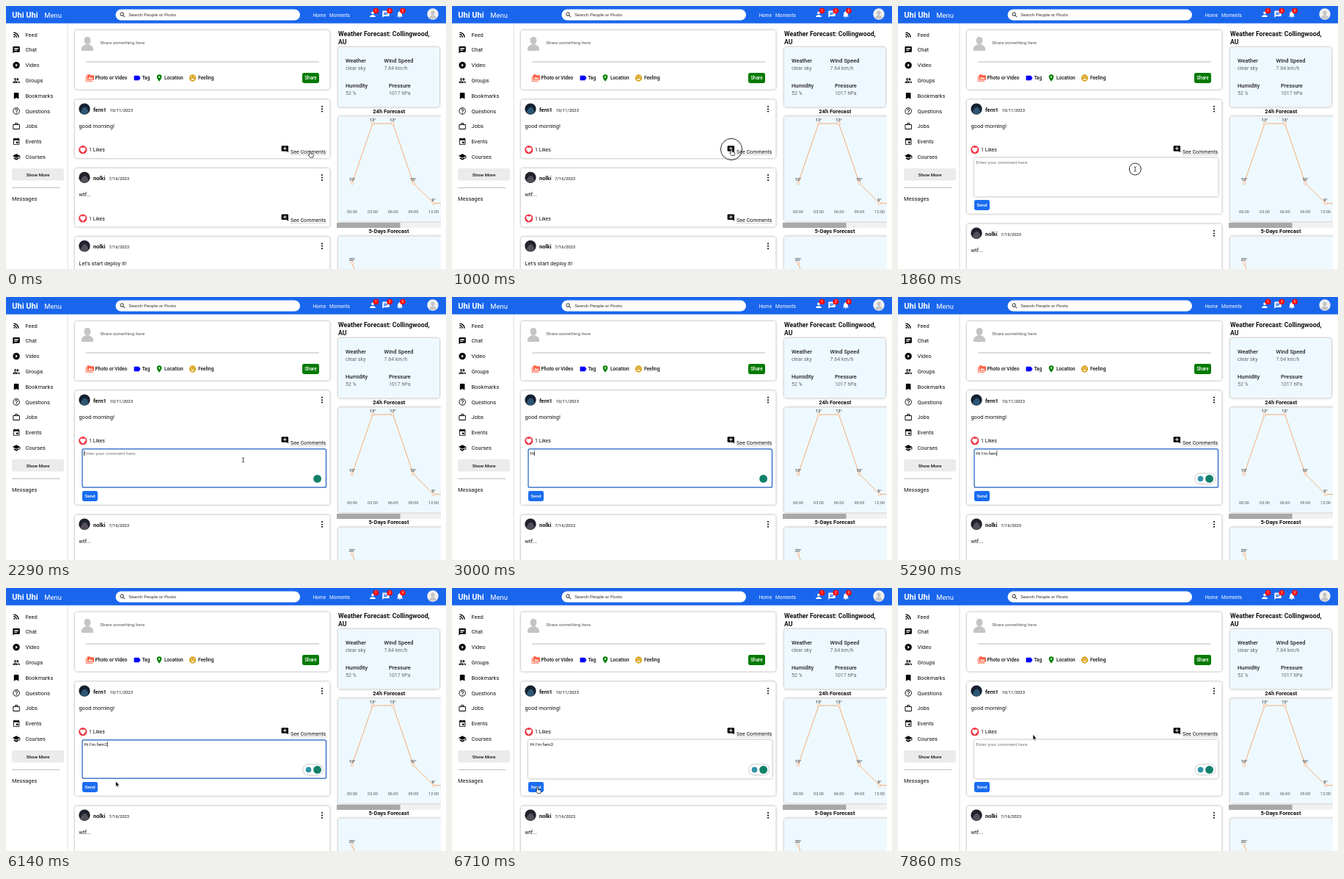
An HTML page for the animation above (8 s loop, 600 px wide and 358 px high).

```html
<!DOCTYPE html>
<html lang="en">
<head>
<meta charset="utf-8">
<title>Social feed</title>
<style>
  html, body { margin: 0; width: 100%; height: 100%; overflow: hidden; background: #fff; }
  svg { display: block; width: 100%; height: 100%; }
  text { font-family: Roboto, sans-serif; white-space: pre; }
  .card { filter: drop-shadow(0 .4px 1.6px #0006); }
  .b { font-weight: 700; }
  .m { font-weight: 500; }
  .mid { text-anchor: middle; }
</style>
</head>
<body>
<svg id="stage" viewBox="0 0 600 358"></svg>
<script>
const icons = {
  feed: 'M4 4.4v2.9A12.7 12.7 0 0 1 16.7 20h2.9A15.6 15.6 0 0 0 4 4.4zm0 5.7v2.8A7 7 0 0 1 11 20h2.9A9.9 9.9 0 0 0 4 10.1zM4 17.8a2.2 2.2 0 1 0 4.4 0 2.2 2.2 0 1 0-4.4 0z',
  chat: 'M20 2H4a2 2 0 0 0-2 2v18l4-4h14a2 2 0 0 0 2-2V4a2 2 0 0 0-2-2zM6 9h12v2H6zm8 5H6v-2h8zm4-6H6V6h12z',
  video: 'M12 2a10 10 0 1 0 0 20 10 10 0 0 0 0-20zm-2 14.5v-9l6 4.5z',
  group: 'M9 5a3.5 3.5 0 1 0 0 7 3.5 3.5 0 0 0 0-7zm0 2a1.5 1.5 0 1 1 0 3 1.5 1.5 0 0 1 0-3zm0 6.7c-2.4 0-7 1.2-7 3.5V19h14v-1.800c0-2.300-4.700-3.500-7-3.500zM4.300 17c.9-.6 2.900-1.300 4.700-1.300s3.900.7 4.700 1.300zM15 12a3.500 3.500 0 1 0 0-7l-1.500.3a5.500 5.500 0 0 1 0 6.400zm1 1.800c1.200.9 2 2 2 3.400V19h4v-1.800c0-2-3.500-3.200-6-3.400z',
  bookmark: 'M17 3H7a2 2 0 0 0-2 2v16l7-3 7 3V5a2 2 0 0 0-2-2z',
  help: 'M11 18h2v-2h-2zM12 2a10 10 0 1 0 0 20 10 10 0 0 0 0-20zm0 18a8 8 0 1 1 0-16 8 8 0 0 1 0 16zm0-14a4 4 0 0 0-4 4h2a2 2 0 1 1 4 0c0 2-3 1.750-3 5h2c0-2.250 3-2.500 3-5a4 4 0 0 0-4-4z',
  work: 'M14 6V4h-4v2zM4 8v11h16V8zm16-2a2 2 0 0 1 2 2v11a2 2 0 0 1-2 2H4a2 2 0 0 1-2-2V8a2 2 0 0 1 2-2h4V4a2 2 0 0 1 2-2h4a2 2 0 0 1 2 2v2z',
  event: 'M17 12h-5v5h5zM16 1v2H8V1H6v2H5a2 2 0 0 0-2 2v14a2 2 0 0 0 2 2h14a2 2 0 0 0 2-2V5a2 2 0 0 0-2-2h-1V1zm3 18H5V8h14z',
  school: 'M5 13.200v4L12 21l7-3.800v-4L12 17zM12 3 1 9l11 6 9-4.900V17h2V9z',
  person: 'M12 12a4 4 0 1 0 0-8 4 4 0 0 0 0 8zm0 2c-2.700 0-8 1.300-8 4v2h16v-2c0-2.700-5.300-4-8-4z',
  bell: 'M12 22a2 2 0 0 0 2-2h-4a2 2 0 0 0 2 2zm6-6v-5c0-3-1.600-5.600-4.500-6.300V4a1.500 1.500 0 0 0-3 0v.7C7.600 5.400 6 8 6 11v5l-2 2v1h16v-1z',
  search: 'M15.500 14h-1a6.500 6.500 0 1 0-.5.5v1l5 5 1.500-1.500zm-6 0a4.500 4.500 0 1 1 0-9 4.500 4.500 0 0 1 0 9z',
  tag: 'M17.600 5.800A2 2 0 0 0 16 5H5a2 2 0 0 0-2 2v10a2 2 0 0 0 2 2h11a2 2 0 0 0 1.600-.8L22 12z',
  pin: 'M12 2a7 7 0 0 0-7 7c0 5.250 7 13 7 13s7-7.750 7-13a7 7 0 0 0-7-7zm0 9.500a2.500 2.500 0 1 1 0-5 2.500 2.500 0 0 1 0 5z',
  smile: 'M12 2a10 10 0 1 0 0 20 10 10 0 0 0 0-20zM8.500 8a1.500 1.500 0 1 1 0 3 1.500 1.500 0 0 1 0-3zM12 18c-2.300 0-4.200-1.700-5-4h10c-.8 2.300-2.700 4-5 4zm3.500-7a1.500 1.500 0 1 1 0-3 1.500 1.500 0 0 1 0 3z',
  media: 'M2 6H0v14a2 2 0 0 0 2 2h18v-2H2zm20-2h-8l-2-2H6a2 2 0 0 0-2 2v12a2 2 0 0 0 2 2h16a2 2 0 0 0 2-2V6a2 2 0 0 0-2-2zM7 15l4.500-6 3.500 4.500 2.500-3L21 15z',
  comment: 'M22 4a2 2 0 0 0-2-2H4a2 2 0 0 0-2 2v12a2 2 0 0 0 2 2h14l4 4zM17 11h-4v4h-2v-4H7V9h4V5h2v4h4z'
};

const text = (x, y, size, str, fill = '#111', cls = '') =>
  `<text x="${x}" y="${y}" font-size="${size}" fill="${fill}" class="${cls}">${str}</text>`;
const rect = (x, y, w, h, fill, r = 0, more = '') =>
  `<rect x="${x}" y="${y}" width="${w}" height="${h}" rx="${r}" fill="${fill}" ${more}/>`;
const circle = (x, y, r, fill, more = '') => `<circle cx="${x}" cy="${y}" r="${r}" fill="${fill}" ${more}/>`;
const line = (x1, x2, y, more = '') => `<path d="M${x1} ${y}H${x2}" stroke="#888" stroke-width=".6" ${more}/>`;
const card = (x, y, w, h, fill = '#fff', more = '') => rect(x, y, w, h, fill, 3, `class="card" ${more}`);
// Icons are placed by their centre.
const icon = (name, x, y, fill = '#000', size = 11.3) =>
  `<path transform="translate(${x - size / 2} ${y - size / 2}) scale(${size / 24})" fill="${fill}" fill-rule="evenodd" d="${icons[name]}"/>`;
const silhouette = (x, y, s, fill) =>
  `<g transform="translate(${x} ${y}) scale(${s})" fill="${fill}"><ellipse cy="-3.5" rx="4.6" ry="5.500"/><path d="M-8.300 10V8.500C-8.300 4-4 3-2.500 2h5C4 3 8.300 4 8.300 8.500V10q0 1-1 1H-7.300q-1 0-1-1z"/></g>`;

function header() {
  const badges = [['person', 500, 504.5, 1], ['chat', 518, 523.3, 3], ['bell', 537, 541, 0]];
  return rect(0, 0, 600, 23.6, '#1966ed') +
    text(8.3, 16, 11, 'Uhi Uhi', '#fff', 'b') + text(52.3, 16, 9.4, 'Menu', '#fff') +
    rect(149.5, 4.4, 251.5, 15.2, '#fff', 7.6) + icon('search', 159, 12, '#111', 9.4) +
    text(167.3, 14.4, 6.25, 'Search People or Posts', '#333') +
    text(418.4, 14.6, 6.6, 'Home', '#fff') + text(441, 14.6, 6.6, 'Moments', '#fff') +
    badges.map(([name, x, bx, n]) => icon(name, x, 11.2, '#fff') + circle(bx, 6.5, 3.8, '#f00') +
      text(bx, 8.4, 5.2, n, '#fff', 'mid')).join('') +
    circle(582, 11, 7.7, '#f1f1f1') + silhouette(582, 11.3, .57, '#c6c6c6');
}

function sidebar() {
  const items = [['feed', 'Feed'], ['chat', 'Chat'], ['video', 'Video'], ['group', 'Groups'], ['bookmark', 'Bookmarks'],
    ['help', 'Questions'], ['work', 'Jobs'], ['event', 'Events'], ['school', 'Courses']];
  return rect(83.5, 23, 1.2, 335, '#e4e4e4') +
    items.map(([name, label], i) => icon(name, 14.1, 39 + 20.8 * i) + text(26.4, 41.6 + 20.8 * i, 7.5, label)).join('') +
    rect(8, 221, 71, 16.5, '#ebebeb', 2.5) + text(43.5, 231.5, 6.25, 'Show More', '#111', 'm mid') +
    line(8, 73, 247.3) + text(8, 264.8, 7.5, 'Messages');
}

function shareBox() {
  const options = [['media', 114.4, 121.5, 'Photo or Video', '#ff6347'], ['tag', 178.8, 185.4, 'Tag', '#00f'],
    ['pin', 209, 216, 'Location', '#008000'], ['smile', 254.5, 262, 'Feeling', '#daa520']];
  return card(94, 33, 347.5, 80.5) + silhouette(111, 50.4, .97, '#c4c4c4') +
    text(128.3, 52.2, 6.25, 'Share something here', '#555') + line(109, 427, 76) +
    options.map(([name, x, tx, label, fill]) => icon(name, x, 98, fill) + text(tx, 100.4, 6.6, label, '#111', 'm')).join('') +
    rect(404, 91, 23, 14, '#007a00', 2.4) + text(415.5, 100.2, 6.4, 'Share', '#fff', 'm mid');
}

function post(y, name, date, body, tones, id = '') {
  return card(94, y, 347.5, 79.5, '#fff', id) +
    circle(107, y + 12.5, 7.7, tones[0]) +
    `<path d="M101.500 ${y + 17}q3-7 6-7t5 7q-5.500 5.500-11 0z" fill="${tones[1]}"/>` +
    text(119, y + 15.9, 7.5, `${name}<tspan dx="4.7" font-size="5.9" font-weight="400">${date}</tspan>`, '#111', 'b') +
    [-3.4, 0, 3.4].map(d => circle(431, y + 12.6 + d, 1, '#000')).join('') +
    text(99.4, y + 38.4, 7.5, body) +
    circle(104.8, y + 68.1, 5.6, '#ee3340') +
    `<path transform="translate(104.800 ${y + 68.4})" d="M0 3.300C-5.500-.5-3-3.600-1.500-3.200Q-.4-3 0-1.900.4-3 1.500-3.200C3-3.600 5.500-.5 0 3.300z" fill="#fff" stroke="#fff" stroke-width=".7"/>` +
    text(113, y + 70.6, 7, '1 Likes') + icon('comment', 380.3, y + 67.3) +
    text(388, y + 73, 7.1, 'See Comments') +
    line(388, 436.8, y + 75, 'stroke-dasharray="1 .7"');
}

function editor() {
  return `<g id="editor">` + rect(104, 206.8, 332.5, 52.4, '#fff', 2, 'id="field"') +
    text(106.3, 215, 6.25, 'Enter your comment here.', '#757575').replace('<text', '<text id="hint"') +
    text(106.3, 215, 6.25, '').replace('<text', '<text id="typed"') +
    rect(0, 208.8, .6, 7.8, '#000', 0, 'id="caret"') +
    `<g id="helper"><g id="pill">${rect(405.5, 240.8, 26.5, 13.2, '#fff', 6.6, 'class="card"')}${circle(412.5, 247.4, 3.8, '#2f93a5')}</g>` +
    circle(424.6, 247.4, 5.4, '#11806a') + '</g>' +
    rect(104, 264, 21, 14, '#1a6df0', 2.4) + text(114.5, 273.2, 6.25, 'Send', '#fff', 'm mid') + '</g>';
}

function weather() {
  const sky = '#eef9ff', orange = '#f4a46a';
  const details = [[463, 77.4, 'Weather', 'clear sky'], [515.6, 77.4, 'Wind Speed', '7.64 km/h'],
    [463, 111.4, 'Humidity', '52 %'], [522, 111.4, 'Pressure', '1017 hPa']];
  const points = [[472, 241, 10], [500, 160, 13], [527.6, 160, 13], [555.4, 241, 10], [583, 268.6, 9]];
  const dot = ([x, y, degrees]) => circle(x, y, 1.8, '#fff', `stroke="${orange}" stroke-width=".7"`) +
    text(x, y - 2.7, 5.7, degrees + '°', '#111', 'mid');
  const path = d => `<path d="${d}" fill="none" stroke="${orange}" stroke-width=".9"/>`;
  return text(453, 41.4, 8.75, 'Weather Forecast: Collingwood,', '#111', 'b') + text(453, 51.6, 8.75, 'AU', '#111', 'b') +
    card(453, 56, 138, 81.5, sky) +
    details.map(([x, y, label, value]) => text(x, y, 7.5, label, '#222', 'm') + text(x, y + 10, 7, value, '#666')).join('') +
    text(522.3, 146.4, 7.5, '24h Forecast', '#111', 'b mid') +
    '<g clip-path="url(#column)">' + card(453, 150.3, 160, 143.2, sky) +
    path('M' + points.map(p => p.slice(0, 2)).join('L') + 'H593') + points.map(dot).join('') +
    points.map(([x], i) => text(x, 282.4, 5.6, String(i * 3).padStart(2, '0') + ':00', '#555', 'mid')).join('') +
    rect(451, 295, 142, 7, '#f1f1f1') + rect(451, 295, 86.6, 7, '#a8a8a8') +
    text(522, 309.3, 7.5, '5-Days Forecast', '#111', 'b mid') +
    card(453, 313.6, 160, 60, sky) + path('M472 350l6 16') + dot([472, 350, 20]) + '</g>';
}

const nightBlue = ['#15202e', '#2c5674'], dusk = ['#20222d', '#54505a'];
const stage = document.getElementById('stage');
stage.innerHTML = '<clipPath id="column"><rect x="450" y="140" width="143" height="218"/></clipPath>' +
  sidebar() + shareBox() +
  post(127.6, 'fern1', '10/11/2023', 'good morning!', nightBlue, 'id="firstCard"') + editor() +
  '<g id="laterPosts">' + post(220.9, 'nolki', '7/16/2023', 'wtf...', dusk) +
  post(314.2, 'nolki', '7/16/2023', "Let's start deploy it!", dusk) + '</g>' +
  weather() + header() +
  `<g id="pointer" stroke-linejoin="round">
    <circle id="ring" fill="none" stroke="#111" stroke-width=".9"/>
    <path id="hand" fill="#fff" stroke="#000" stroke-width=".7" d="M0 0Q1 0 1 1V3.500L4 4.200Q5 4.600 4.800 5.700L4.200 8.600H.2L-2.200 5.600C-2.700 4.800-1.900 4.300-1.300 4.800L-.9 5.200V1Q-.9 0 0 0z"/>
    <path id="arrow" fill="#000" stroke="#fff" stroke-width=".5" d="M0 0V7L1.600 5.600 2.700 8.200 3.900 7.700 2.800 5.200H5z"/>
    <path id="beam" fill="none" stroke="#111" stroke-width=".7" d="M-1.500-3Q0-3 0-2 0-3 1.500-3M0-2V2M-1.500 3Q0 3 0 2 0 3 1.500 3"/>
  </g>`;

const get = id => document.getElementById(id);
const show = (id, on) => get(id).setAttribute('visibility', on ? 'inherit' : 'hidden');

const LOOP = 8000, FPS = 7;
const message = "Hi I'm fern2";
// Pointer stops: time, x, y
const stops = [[0, 414.5, 197.5], [860, 381, 195], [1150, 381, 195], [1570, 323.4, 222], [5710, 323.4, 222],
  [6290, 116.5, 271], [6860, 116.5, 271], [7857, 184, 199.6], [LOOP, 184, 199.6]];
const clicks = [1000, 1714, 6428];

function pointerAt(t) {
  const i = stops.findIndex(stop => stop[0] > t);
  const [t0, x0, y0] = stops[i - 1], [t1, x1, y1] = stops[i];
  const p = (t - t0) / (t1 - t0), eased = p * p * (3 - 2 * p);
  return [x0 + (x1 - x0) * eased, y0 + (y1 - y0) * eased];
}

function render(t) {
  const opened = t >= 1280, focused = t >= 1990 && t < 6560, cleared = t >= 6990;
  const count = t < 2560 ? 0 : Math.min(message.length, 1 + Math.floor((t - 2560) / 260));
  const typed = cleared ? '' : message.slice(0, count);

  show('editor', opened);
  get('firstCard').setAttribute('height', opened ? 155.2 : 79.5);
  get('laterPosts').setAttribute('transform', `translate(0 ${opened ? 75.9 : 0})`);
  const field = get('field');
  field.setAttribute('class', focused ? '' : 'card');
  field.setAttribute('stroke', focused ? '#1d5fbf' : 'none');
  field.setAttribute('stroke-width', 1.2);
  show('hint', opened && !typed);
  if (!opened) get('hint').setAttribute('visibility', 'hidden');
  get('typed').textContent = typed;
  show('caret', focused);
  get('caret').setAttribute('x', 106.3 + (typed ? get('typed').getComputedTextLength() : 0));
  show('helper', t >= 2130);
  show('pill', t >= 3560);
  if (t < 3560) get('pill').setAttribute('visibility', 'hidden');

  const [x, y] = pointerAt(t);
  const within = (l, top, r, bottom) => x > l && x < r && y > top && y < bottom;
  const onLink = within(374, 189, 437, 204) || opened && within(104, 264, 125, 278);
  const onField = opened && within(104, 206.8, 436.5, 259);
  show('pointer', t < 2420 || t >= 5700);
  get('pointer').setAttribute('transform', `translate(${x} ${y})`);
  show('hand', onLink);
  show('beam', onField && !onLink);
  show('arrow', !onLink && !onField);

  const age = Math.min(...clicks.filter(c => t >= c - 1).map(c => t - c));
  show('ring', age < 250);
  get('ring').setAttribute('r', age < 100 ? 14.6 : 8);
}

function tick(now) {
  const frame = Math.floor((now % LOOP + 6) * FPS / 1000) % (LOOP * FPS / 1000);
  render(frame * 1000 / FPS);
  requestAnimationFrame(tick);
}
tick(performance.now());
</script>
</body>
</html>
```
